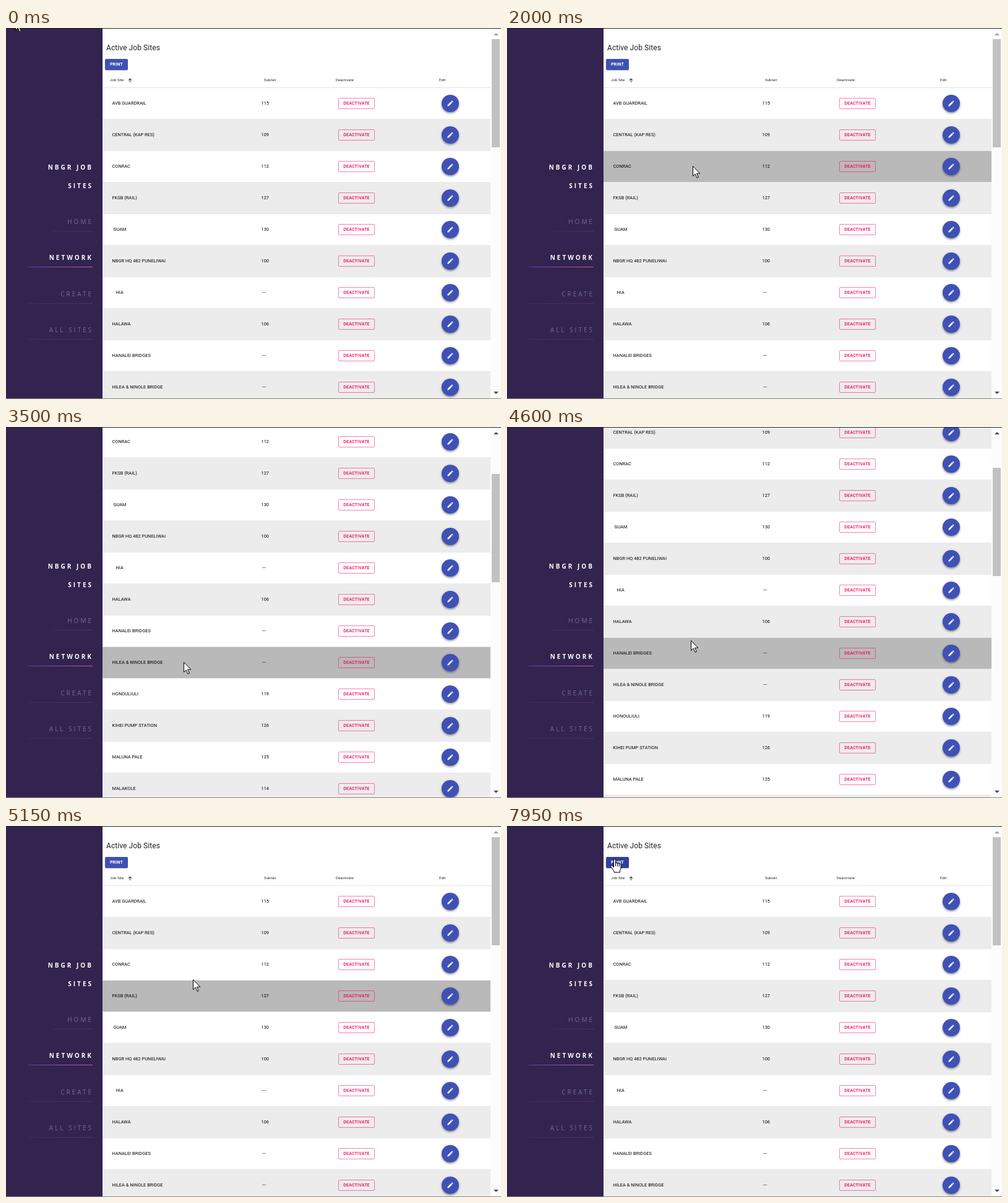
Animation of 800 by 600 pixels, one loop 8 s. Source, as an HTML page:

```html
<!DOCTYPE html>
<html lang="en">
<head>
<meta charset="utf-8">
<title>Active Job Sites</title>
<style>
  html, body { margin: 0; width: 100%; height: 100%; overflow: hidden; background: #fff; }
  body { position: relative; font: 7.3px Roboto, sans-serif; letter-spacing: .01071em; color: #000; }
  body *, body::before, body::after { position: absolute; box-sizing: border-box; white-space: nowrap; }
  body::before, body::after { content: ""; left: 0; width: 100%; height: 1px; top: 0; background: #222; z-index: 2; }
  body::after { top: 599px; background: #858585; }

  nav { left: 0; top: 0; width: 156px; height: 600px; background: #32244f; z-index: 1;
        font: 10px/14px "Open Sans", sans-serif; letter-spacing: 3px; color: #fff; }
  nav b, nav i { right: 15px; font-style: normal; }
  nav hr { right: 16px; margin: 0; border: 0; height: 1px; background: linear-gradient(90deg, #4c44b0, #8a4fb0 45%, #d0559f); }
  nav .dim { opacity: .32; }
  nav hr.dim { opacity: .24; }

  #page, #rows { left: 0; top: 0; width: 783px; height: 820px; }
  h1 { margin: 0; left: 162px; top: 24px; font: 12px/16px Roboto, sans-serif; color: #222; }
  .head { top: 80px; font-size: 6px; line-height: 8px; color: #222; }
  #rule { left: 156px; top: 96px; width: 627px; height: 1px; background: #e4e4e4; }
  .btn { border-radius: 2px; height: 18px; font-weight: 500; font-size: 7px; text-align: center; letter-spacing: .02857em; }
  #print { left: 160px; top: 50px; width: 37px; line-height: 18px; color: #fff; font-weight: 700;
           background: #3f51b5; box-shadow: 0 1px 1px #0003; }
  #print.over { background: #303f9f; }

  .row { left: 156px; width: 627px; height: 51px; line-height: 49px; border-bottom: 1px solid #e9e9e9; }
  .row:nth-child(even) { background: #ececec; }
  .row.over { background: #b9b9b9; }
  .row .btn { left: 381px; top: 16px; width: 59px; line-height: 16px; color: #f50057; border: 1px solid #f5005780; }
  .edit { left: 548px; top: 11px; width: 28px; height: 28px; border-radius: 50%; background: #3f51b5;
          box-shadow: 0 2px 3px #0005, 0 1px 5px #0002; }
  .edit svg { left: 8px; top: 8px; width: 12px; height: 12px; fill: #fff; }

  #bar { left: 783px; top: 0; width: 17px; height: 600px; background: #fcfcfc; }
  #thumb { left: 2px; top: 18px; width: 13px; height: 175px; background: #c1c1c1; }
  #bar svg { left: 0; top: 0; }
  #pointer { left: 0; top: 0; overflow: visible; z-index: 3; fill: #fff; stroke: #000; }
</style>
</head>
<body>
<nav></nav>
<div id="page">
  <h1>Active Job Sites</h1>
  <div id="print" class="btn">PRINT</div>
  <svg style="left:196px;top:80px" width="9" height="9" viewBox="0 0 24 24"><path d="M4 12l1.4 1.4L11 7.8V21h2V7.8l5.6 5.6L20 12l-8-8z"/></svg>
  <div id="rule"></div>
  <div id="rows"></div>
</div>
<div id="bar">
  <div id="thumb"></div>
  <svg width="17" height="600"><path id="up" d="M5 12h8l-4-4z"/><path d="M5 588h8l-4 4z" fill="#505050"/></svg>
</div>
<svg id="pointer" width="1" height="1"><path/></svg>
<script>
const $ = id => document.getElementById(id);
const TOP = 97, PITCH = 51, LOOP = 8000, STEP = 50;

// Sidebar: label, middle of the text, underline length, active
const menu = [["NBGR JOB", 225, 0, 1], ["SITES", 255, 0, 1], ["HOME", 313, 65], ["NETWORK", 371, 105, 1],
              ["CREATE", 430, 105], ["ALL SITES", 488, 105]];
document.querySelector("nav").innerHTML = menu.map(([label, y, line, on]) => {
  const tag = on ? "b" : "i", dim = on ? "" : "dim";
  return `<${tag} class="${dim}" style="top:${y - 7}px">${label}</${tag}>` +
    (line ? `<hr class="${dim}" style="top:${y + 15}px;width:${line}px">` : "");
}).join("");

for (const [label, x] of [["Job Site", 168], ["Subnet", 417], ["Deactivate", 533], ["Edit", 700]])
  $("page").insertAdjacentHTML("beforeend", `<div class="head" style="left:${x}px">${label}</div>`);

// Name, subnet, indent
const sites = [["AVB GUARDRAIL", 115], ["CENTRAL (KAP RES)", 109], ["CONRAC", 112], ["FKSB (RAIL)", 127],
  ["GUAM", 130, 2], ["NBGR HQ 482 PUNELIWAI", 100], ["HIA", "---", 6], ["HALAWA", 106],
  ["HANALEI BRIDGES", "---"], ["HILEA &amp; NINOLE BRIDGE", "---"], ["HONOULIULI", 119],
  ["KIHEI PUMP STATION", 126], ["MALUNA PALE", 125], ["MALAKOLE", 114]];
const pencil = `<svg viewBox="0 0 24 24"><path d="M3 17.25V21h3.75L17.8 9.94l-3.75-3.75zM20.7 7.04a1 1 0 0 0 0-1.41l-2.34-2.34a1 1 0 0 0-1.41 0l-1.83 1.83 3.75 3.75z"/></svg>`;
$("rows").innerHTML = sites.map(([name, subnet, indent = 0], i) =>
  `<div class="row" style="top:${TOP + PITCH * i}px"><span style="left:${15.5 + indent}px">${name}</span>` +
  `<span style="left:${subnet === "---" ? 258 : 256.5}px">${subnet}</span>` +
  `<div class="btn">DEACTIVATE</div><div class="edit">${pencil}</div></div>`).join("");
const rows = [...$("rows").children];

// Pointer path: time, x, y
const path = [[0, 15, -13], [200, 15, -13], [250, 15, -40], [350, 228, -30], [400, 230, -12], [950, 290, 125],
  [1200, 290, 125], [2000, 300, 223], [2050, 300, 234], [2200, 300, 248], [3000, 300, 248], [3500, 287, 380],
  [3750, 290, 422], [3850, 290, 422], [4300, 297, 345], [4850, 297, 345], [5150, 302, 248], [5350, 302, 190],
  [6200, 215, 125], [6350, 205, 122], [7000, 205, 122], [7850, 174, 57], [7950, 174, 53], [LOOP, 174, 53]];
const arrow = "M.5.5V16.5L4.2 13 7 19.3 9.3 18.3 6.6 12.2H11.8z";
const hand = "M-1.5 14V2a1.5 1.5 0 0 1 3 0V8q0-1.5 1.5-1.5T4.5 8.5q0-1.3 1.5-1.3T7.3 9q0-1 1.3-1T10 9.5V15q0 2-1.5 4V22H-1V20L-5.5 14q-1.5-2-.5-3t2.5.5zM1.5 8v4M4.5 8.5v4M7.3 9v3.5";

function pointerAt(t) {
  const k = Math.max(1, path.findIndex(p => p[0] >= t));
  const [t0, x0, y0] = path[k - 1], [t1, x1, y1] = path[k], f = (t - t0) / (t1 - t0);
  return [Math.round(x0 + (x1 - x0) * f), Math.round(y0 + (y1 - y0) * f)];
}

const WHEEL_DOWN = 2337, WHEEL_UP = 4489, GLIDE = 410;
const glide = (t, start) => {
  const f = Math.min(1, Math.max(0, (t - start) / GLIDE));
  return f * f * (3 - 2 * f);
};
const scrollAt = t => Math.round(200 * (glide(t, WHEEL_DOWN) - glide(t, WHEEL_UP)));

// The highlight trails the pointer by one step and holds while the page glides
function hoverAt(t) {
  for (const start of [WHEEL_DOWN, WHEEL_UP])
    if (t > start && t < start + GLIDE) t = start;
  const late = Math.max(0, t - STEP), [x, y] = pointerAt(late);
  return x < 156 ? -1 : Math.floor((y + scrollAt(t) - TOP) / PITCH);
}

function draw(now) {
  const t = Math.floor(now % LOOP / STEP) * STEP;
  const [x, y] = pointerAt(t), scroll = scrollAt(t), hover = hoverAt(t);
  const onPrint = scroll === 0 && x >= 160 && x < 197 && y >= 50 && y < 68;
  $("page").style.top = -scroll + "px";
  $("thumb").style.top = 18 + Math.round(scroll * .29) + "px";
  $("up").setAttribute("fill", scroll ? "#505050" : "#a3a3a3");
  rows.forEach((row, i) => row.classList.toggle("over", i === hover));
  $("print").classList.toggle("over", onPrint);
  $("pointer").style.transform = `translate(${x}px,${y}px)`;
  $("pointer").firstChild.setAttribute("d", onPrint ? hand : arrow);
  requestAnimationFrame(draw);
}
requestAnimationFrame(draw);
</script>
</body>
</html>
```
